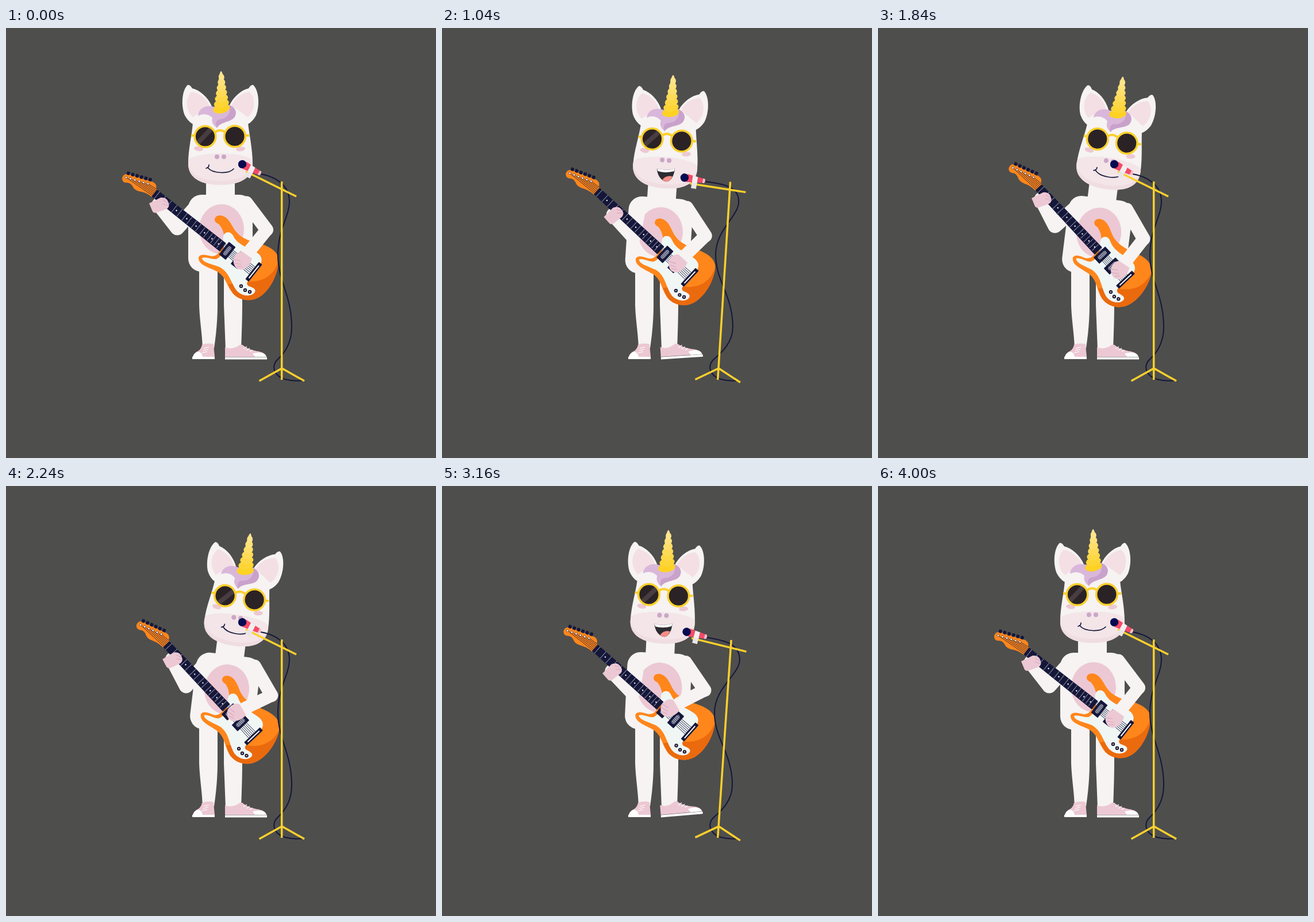
Write an HTML page that moves like this. It is 748 px wide and 748 px high and loops after 4.04 s.

```html
<!DOCTYPE html>
<html lang="en">
<head>
<meta charset="utf-8">
<title>Unicorn singer</title>
<style>
  html, body { margin: 0; width: 100%; height: 100%; overflow: hidden; background: #4e4e4d; }
  svg { display: block; width: 100vw; height: 100vh; }
  .skin { fill: #f6f3f2; }
  .limb { fill: none; stroke: #f6f3f2; stroke-linejoin: round; stroke-linecap: round; }
  .pink { fill: #ecc8d4; }
  .navy { fill: #15173a; }
  .gold { fill: none; stroke: #fbd02c; stroke-width: 3.5; }
  .line { fill: none; stroke: #15173a; }
  .crease { fill: none; stroke: #d8abbd; stroke-width: 1.2; stroke-linecap: round; }
</style>
</head>
<body>
<svg viewBox="0 0 748 748">
  <defs>
    <clipPath id="lenses"><circle cx="346.5" cy="189" r="17"/><circle cx="398" cy="188.5" r="17"/></clipPath>
    <g id="ear">
      <path class="skin" d="M316 99C306 108 304 135 311 152Q317 163 325 167L358 136C351 120 337 108 324 105Q320 98 316 99Z"/>
      <path fill="#f3dfe4" d="M323 111C312 120 311 142 325 155L354 135C347 121 336 113 323 111Z"/>
    </g>
  </defs>

  <g id="legs">
    <path class="skin" d="M336 410V482C337 510 341 530 342 557H362C366 530 368 505 368 482V410Z"/>
    <path class="skin" d="M379 410V482C380 510 381 530 382 560H409C410 530 411 505 411 480V410Z"/>
    <path class="pink" d="M341 551Q351 547 361 550L363 572H325Q327 565 334 562Q340 558 341 551Z"/>
    <path fill="#fff" d="M325 572Q327 565 334 563Q341 564 342 572ZM324 572H363V576H324Z"/>
    <path d="M344 557L353 555M343 561L352 559M341 565L350 563" stroke="#fff" stroke-width="1.2"/>
  </g>
  <g id="foot">
    <path class="pink" d="M381 555Q393 561 407 551L411 551Q420 559 436 562Q451 564 453 572H381Z"/>
    <path fill="#fff" d="M429 566Q450 561 453 572H433ZM381 572.5H454V576.5H381Z"/>
    <path d="M413 558L419 554M418 561L424 557M424 563L429 560" stroke="#fff" stroke-width="1.2"/>
  </g>

  <g id="torso">
    <rect class="skin" x="348" y="255" width="50" height="60"/>
    <rect class="skin" x="317" y="290" width="112" height="134" rx="23"/>
    <ellipse class="pink" cx="375" cy="350" rx="39" ry="43.5"/>
  </g>
  <path id="fretArm" class="limb" stroke-width="25"/>

  <g id="guitar">
    <path fill="#ff861b" d="M363 334Q363 326 373 326C388 328 392 344 400 354C408 364 420 369 432 373C452 377 472 385 474 402C474 425 462 452 445 465C430 477 408 476 395 462C383 448 383 432 366 423C352 416 334 412 335 399C339 391 350 396 358 397C370 397 374 385 378 375C382 362 378 350 370 341Q363 338 363 334Z"/>
    <path fill="#eb6a0d" d="M474 405C474 425 462 452 445 465C430 477 408 476 395 462L386 446L418 441C445 443 466 432 474 405Z"/>
    <path fill="#eff6f4" d="M383 356Q391 353 396 363C404 378 422 382 437 391Q448 399 443 410L424 438C418 442 418 446 422 449Q436 453 433 459C428 469 408 467 400 455C390 440 388 425 372 416C360 411 341 408 341 400C348 397 358 403 366 402C376 398 380 384 379 375C376 365 378 358 383 356Z"/>
    <path fill="#ff861b" d="M254 294Q245 287 236 285Q223 283 220 275Q216 268 208 269Q202 268 202 261Q204 253 212 254L256 268Q263 272 261 279L264 281Z"/>
    <g id="hardware"></g>
    <g id="neck" transform="translate(258 287) rotate(38.4)"></g>
  </g>
  <g id="fretHand">
    <path class="pink" d="M-17 -2L3 -12Q13 -13 16 -5Q20 4 13 8L-4 14Q-10 16 -12 10Z"/>
    <path class="crease" d="M8 -7L15 -3M7 -1L17 2"/>
  </g>

  <g id="strumArm">
    <path class="limb" stroke-width="23" d="M418 304L453.5 351"/>
    <g id="forearm">
      <path class="limb" stroke-width="22" d="M453.5 351L422 390"/>
      <path class="pink" d="M411 389L428 401Q425 414 413 420Q402 422 398 414Q393 406 398 397Q403 388 411 389Z"/>
      <path class="crease" d="M397 403L408 405M398 409L409 411M402 415L411 415"/>
    </g>
  </g>

  <g id="head">
    <use href="#ear"/>
    <use href="#ear" transform="translate(746 0) scale(-1 1)"/>
    <path class="skin" d="M325 165C330 150 345 138 373 138C401 138 417 150 421 165C423 185 429 210 429 236C429 262 405 273 373 273C341 273 317 262 317 236C317 210 323 190 325 165Z"/>
    <path fill="#efdde2" d="M318 229C335 215 411 215 428 229L429 236C429 262 405 273 373 273C341 273 317 262 317 236Z"/>
    <path fill="#f3e5e8" d="M318 229C335 215 411 215 428 229L429 234C427 256 404 266 373 266C342 266 319 256 317 234Z"/>
    <path fill="#d9b7da" d="M334 153C335 138 350 133 362 137C375 128 398 132 400 146C400 158 388 164 376 163Q368 166 367 174Q356 166 359 156C352 149 342 148 334 153Z"/>
    <path fill="#c9a2cb" d="M388 134C400 138 403 150 396 157C388 164 372 164 367 174Q362 162 371 159C385 158 392 148 388 134Z"/>
    <g id="horn"></g>
    <ellipse class="pink" cx="335" cy="210" rx="8" ry="4" transform="rotate(8 335 210)"/>
    <ellipse class="pink" cx="408" cy="210.5" rx="8" ry="4" transform="rotate(-8 408 210)"/>
    <g fill="#2b2226"><circle cx="346.5" cy="189" r="18"/><circle cx="398" cy="188.5" r="18"/></g>
    <g clip-path="url(#lenses)" stroke="#483e42">
      <path id="glareLeft" d="M331 207L365 171" stroke-width="8"/>
      <path id="glareRight" d="M382 207L416 171" stroke-width="8"/>
    </g>
    <g class="gold"><circle cx="346.5" cy="189" r="18.3"/><circle cx="398" cy="188.5" r="18.3"/>
      <path d="M364 181Q372 175 381 181M322 187H328M417 187H423" stroke-width="4"/></g>
    <g fill="#cba6c8"><circle cx="367" cy="224" r="4"/><circle cx="379" cy="224" r="4"/></g>
    <path id="smile" class="line" stroke-width="1.7" stroke-linecap="round" d="M353 238Q353 243 348 244M351 243C360 254 388 254 396 245"/>
    <g id="grin">
      <path fill="#2c2c31" d="M359 239Q374 243 390 237C390 252 383 261 377 261C367 260 360 250 359 239Z"/>
      <path fill="#fff" d="M359 239Q374 243 390 237L389 242Q374 247 361 244Z"/>
      <path fill="#f58f86" d="M370 258Q376 249 387 251Q383 261 377 261Q373 261 370 258Z"/>
    </g>
    <g id="shout">
      <path fill="#2c2c31" d="M354 240C368 245 386 245 399 240Q399 248 394 256Q390 261 382 261L368 261Q355 259 354 240Z"/>
      <path fill="#fff" d="M354 240C368 245 386 245 399 240L398 245Q376 250 355 245Z"/>
      <path fill="#f58f86" d="M364 260Q368 255 376 255Q385 255 389 259Q386 261 382 261L368 261Z"/>
    </g>
  </g>

  <path id="cable" class="line" stroke-width="2"/>
  <g id="stand" class="gold">
    <path d="M479.7 267V612M440.5 614L480 592L519 614"/>
    <g id="boom">
      <path d="M417 249.5L505 293"/>
      <g stroke="none" transform="translate(411 237) rotate(27)">
        <path fill="#e9e5e6" d="M14 0H23V16H14Z"/>
        <path fill="#f64a68" d="M4 -7L14 -6V6L4 7Z"/>
        <path fill="#f3eef0" d="M14 -6L23 -5V6L14 6Z"/>
        <path fill="#f64a68" d="M23 -5L32 -4V4L23 5Z"/>
        <path fill="#f4bfca" d="M32 -4H35Q38 0 35 4H32Z"/>
        <circle fill="#080a50" r="7.2"/>
      </g>
    </g>
  </g>
</svg>
<script>
const $ = id => document.getElementById(id);
const LOOP = 4040, STEP = 40;
const range = n => [...Array(n).keys()];

function add(parent, tag, attrs) {
  const el = document.createElementNS('http://www.w3.org/2000/svg', tag);
  for (const k in attrs) el.setAttribute(k, attrs[k]);
  parent.append(el);
}

function buildHorn() {
  const horn = $('horn');
  add(horn, 'path', { d: 'M374 75Q377 76 378.5 90L383 135H365L370 90Q371.500 76 374 75Z', fill: '#fbe493' });
  range(7).forEach(i => {
    const cy = 140.5 - 9.2 * i;
    add(horn, 'ellipse', {
      cx: 374.8, cy, rx: 14.8 - 1.65 * i, ry: 7.8 - .3 * i,
      transform: `rotate(-12 374.8 ${cy})`,
      fill: `rgb(253 ${210 + 3 * i} ${36 + 17 * i})`
    });
  });
}

function buildGuitar() {
  const hardware = $('hardware'), neck = $('neck');
  range(6).forEach(i => {
    const x = 209 + 7.6 * i, y = 260 + 2.2 * i;
    add(hardware, 'rect', { class: 'navy', x: x - 1, y: y - 11, width: 5.5, height: 6, rx: 1.5, transform: `rotate(16 ${x} ${y})` });
    add(hardware, 'path', { class: 'line', d: `M${x} ${y}L${254.5 + 1.7 * i} ${291.5 - 2.1 * i}`, 'stroke-width': .8 });
    add(hardware, 'circle', { cx: x, cy: y, r: 1.8, fill: '#fff', stroke: '#15173a', 'stroke-width': .6 });
  });
  [[409, 449], [416, 456], [424, 459]].forEach(([cx, cy]) =>
    add(hardware, 'circle', { cx, cy, r: 2.2, fill: '#f3b9a0', stroke: '#15173a', 'stroke-width': 2 }));

  add(neck, 'path', { class: 'navy', d: 'M0 -7.5L152 -9V9L0 7.5Z' });
  range(15).forEach(i => {
    const x = 6 + 13.5 * i - .26 * i * i;
    add(neck, 'path', { d: `M${x} -7.5V7.5`, stroke: '#d5dbe2', 'stroke-width': 1, 'stroke-dasharray': '1.6 1' });
    if (i % 2) add(neck, 'circle', { cx: x + 5, cy: 0, r: 1.2, fill: '#fff' });
  });
  [162, 188].forEach(x => {
    add(neck, 'rect', { class: 'navy', x: x - 7.5, y: -14, width: 15, height: 28, rx: 1 });
    add(neck, 'rect', { x: x - 3.5, y: -9, width: 7, height: 18, rx: 3, fill: '#9ea3b3' });
  });
  range(6).forEach(i => add(neck, 'path', {
    class: 'line', d: `M152 ${2.6 * i - 6.5}L219 ${3.2 * i - 8}`, 'stroke-width': .9
  }));
  add(neck, 'rect', { class: 'navy', x: 217, y: -19, width: 7.5, height: 38, rx: 1 });
  add(neck, 'rect', { x: 220, y: -14, width: 2, height: 28, fill: '#fff' });
}

const wave = (t, period) => (1 - Math.cos(2 * Math.PI * t / period)) / 2;

// Eased interpolation through [time, value] pairs.
function track(keys, t) {
  const i = keys.findIndex(k => k[0] > t);
  if (i < 0) return keys[keys.length - 1][1];
  if (!i) return keys[0][1];
  const [t0, a] = keys[i - 1], [t1, b] = keys[i];
  const f = (t - t0) / (t1 - t0);
  return a + (b - a) * f * f * (3 - 2 * f);
}

function turn([x, y], deg, [cx, cy], dx = 0, dy = 0) {
  const a = deg * Math.PI / 180, c = Math.cos(a), s = Math.sin(a);
  return [cx + (x - cx) * c - (y - cy) * s + dx, cy + (x - cx) * s + (y - cy) * c + dy];
}

// Two-bone joint position between shoulder and hand.
function elbowOf([sx, sy], [hx, hy], upper, fore) {
  const dx = hx - sx, dy = hy - sy;
  const d = Math.min(Math.hypot(dx, dy), upper + fore - .1);
  const along = (upper * upper - fore * fore + d * d) / (2 * d);
  const off = Math.sqrt(Math.max(0, upper * upper - along * along));
  return [sx + (dx * along + dy * off) / d, sy + (dy * along - dx * off) / d];
}

const SLIDE = [[0, 0], [240, 8], [640, 22], [1000, 31], [1160, 31], [1460, 4], [1640, 0]];
const STRUM = [[0, 0], [170, 21.6], [260, 18], [440, 8.7], [640, -8.5], [740, -12], [1000, 0]];
const BOOM = [[440, 0], [840, -21], [1040, -21], [1460, 2.5], [1760, 0]];
const TAP = [[880, 0], [1120, -5], [1480, -5], [1720, 0]];
const CABLE_MID = [[560, 0], [820, 8], [1160, 1], [1440, 6], [1760, 0]];
const CABLE_LOW = [[560, 0], [900, 10], [1160, 8], [1440, -1], [1760, 0]];
const MOUTHS = [[480, 'smile'], [720, 'grin'], [980, 'shout'], [1300, 'grin'], [1680, 'shout'], [2000, 'smile']];

const HIP = [368, 425], BODY = [375, 380], BASE = [480, 612], JOINT = [480, 281];
const move = (id, value) => $(id).setAttribute('transform', value);
const show = (id, on) => { $(id).style.display = on ? '' : 'none'; };
const rotate = (deg, [x, y]) => `rotate(${deg} ${x} ${y})`;

function drawSinger(t, phrase, beat) {
  const sway = wave(t, 4000), bob = 7 * wave(t, 800);
  const lean = 7.2 * sway, torso = `translate(0 ${bob}) ${rotate(lean, HIP)}`;
  move('torso', torso);
  move('strumArm', torso);
  move('forearm', rotate(track(STRUM, beat), [453.5, 351]));
  move('head', `translate(${21.8 * sway} ${bob + 2.5 * sway}) ${rotate(8.7 * sway, [373, 280])}`);
  move('foot', rotate(track(TAP, phrase), [381, 576]));

  const tilt = 8.5 * sway, gx = 6.5 * sway, gy = bob + 1.5 * sway;
  move('guitar', `translate(${gx} ${gy}) ${rotate(tilt, BODY)}`);

  const slide = track(SLIDE, phrase);
  const hand = turn([266 + .784 * slide, 307 + .621 * slide], tilt, BODY, gx, gy);
  const shoulder = turn([335, 306], lean, HIP, 0, bob);
  const elbow = elbowOf(shoulder, hand, 56, 52);
  $('fretArm').setAttribute('d', `M${shoulder}L${elbow}L${hand}`);
  move('fretHand', `translate(${hand}) rotate(${-.6 * slide})`);

  const mouth = MOUTHS.find(m => phrase < m[0])[1];
  ['smile', 'grin', 'shout'].forEach(id => show(id, id === mouth));

  const p = beat / 1000;
  move('glareLeft', `translate(${-4 + 26 * p} 0)`);
  move('glareRight', `translate(${-14 + 26 * p} 0)`);
  show('glareLeft', p < .72);
  show('glareRight', p > .35 && p < .72);
}

function drawStand(phrase) {
  const push = phrase > 560 && phrase < 1720 ? 3.9 * wave(phrase - 560, 1160) : 0;
  const dip = track(BOOM, phrase);
  move('stand', rotate(push, BASE));
  move('boom', rotate(dip, JOINT));

  const [mx, my] = turn(turn([443, 254], dip, JOINT), push, BASE);
  const top = 493 + push * 6.4, mid = 473 + track(CABLE_MID, phrase), low = 497 + track(CABLE_LOW, phrase);
  $('cable').setAttribute('d',
    `M${mx} ${my}C${mx + 24} ${my + 4} ${top} 272 ${top} 302C${top} 328 ${mid} 350 ${mid} 395` +
    `C${mid} 440 ${low} 465 ${low} 520C${low} 550 482 568 472 577C460 590 468 606 485 611Q500 615 516 613`);
}

function draw(elapsed) {
  const t = Math.floor(elapsed % LOOP / STEP) * STEP;
  drawSinger(t, t % 2000, t % 1000);
  drawStand(t % 2000);
}

buildHorn();
buildGuitar();
const start = performance.now();
function tick(now) {
  draw(Math.max(0, now - start));
  requestAnimationFrame(tick);
}
draw(0);
requestAnimationFrame(tick);
</script>
</body>
</html>
```
